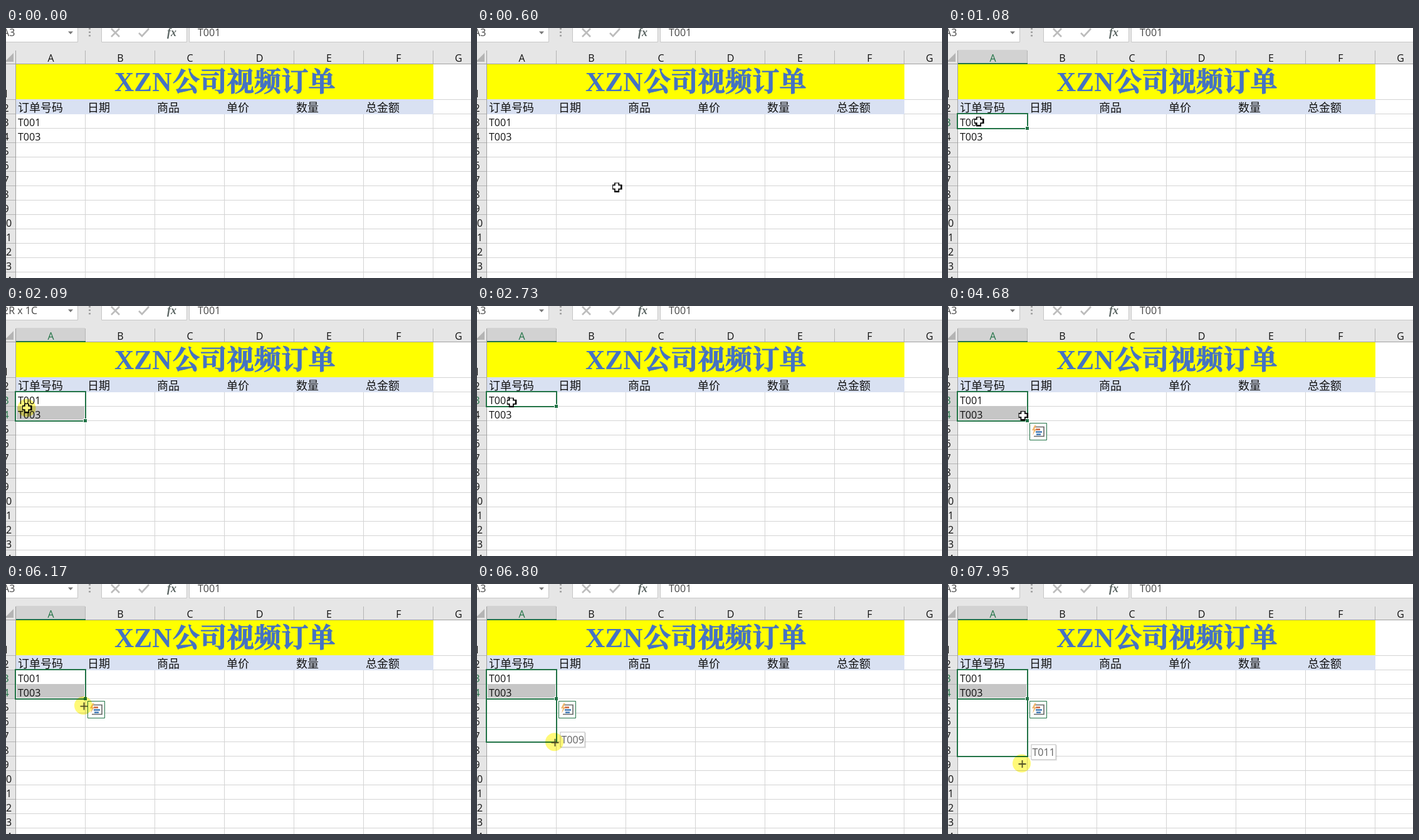
These frames come from a looping animation (742x400 px, 8000 ms). An HTML page:

```html
<!DOCTYPE html>
<html lang="zh">
<head>
<meta charset="utf-8">
<style>
html, body { margin: 0; width: 100%; height: 100%; overflow: hidden; background: #fff; }
svg { display: block; width: 742px; height: 400px; }
text { font: 16px "Open Sans", "Noto Sans CJK SC", "Noto Sans CJK", sans-serif; fill: #111; }
.cjk { font: 300 18px "Noto Sans CJK SC", "Noto Sans CJK", sans-serif; }
.title { font: bold 43.3px "Liberation Serif", "Noto Serif CJK SC", "Noto Sans CJK SC", "Noto Sans CJK", serif; fill: #4472c4; }
.heavy { stroke: #4472c4; stroke-width: .9; }
.fx { font: italic bold 18px "Liberation Serif", serif; fill: #5c6664; }
.mid { text-anchor: middle; }
.bar { fill: #444; }
.edge { fill: none; stroke: #217346; stroke-width: 2; }
</style>
</head>
<body>
<svg id="stage" viewBox="0 0 742 400" xmlns="http://www.w3.org/2000/svg">
  <g id="sheet"></g>
  <g id="head"></g>
  <g id="bars">
    <rect width="742" height="35" fill="#e6e6e6"/>
    <path d="M-5.5 22.5h120v-30M152.5-5v27.5h136V-5M292.5-5v27.5h460V-5" fill="#fff" stroke="#c6c6c6"/>
    <path d="M-5-5H114V22H-5z" fill="#fff"/>
    <path d="M99 5.5h8l-4 4.5z" fill="#777"/>
    <path d="M133.5 0V14" stroke="#a0a0a0" stroke-width="3" stroke-dasharray="2.5 3"/>
    <path d="M168 1l13 13M181 1l-13 13M212 8l5 5 11-12" fill="none" stroke="#bcbcbc" stroke-width="2.6"/>
    <text x="257" y="13" class="fx">fx</text>
    <text x="306" y="13" class="bar">T001</text>
    <text id="name" x="-5" y="13" class="bar">A3</text>
  </g>
  <g id="sel">
    <rect id="box" x="15" y="137" width="112" class="edge"/>
    <rect id="grip" x="123.5" width="6" height="6" fill="#217346" stroke="#fff"/>
  </g>
  <rect id="fill" x="15" y="137" width="112" class="edge"/>
  <g id="quick" transform="translate(130 187)">
    <path d="M.5.5h27v27H.5z" fill="#fff" stroke="#217346"/>
    <path d="M9 6.5h14v15H7" fill="none" stroke="#666" stroke-width="1.6"/>
    <path d="M10 10.5h7" stroke="#c9603c" stroke-width="2.5"/>
    <path d="M10 14.5h10M11 18.5h7" stroke="#3f78b4" stroke-width="2.5"/>
    <path d="M8 4L4 12h3l-2 8 6-10H8l3-6z" fill="#f0b870"/>
  </g>
  <g id="tip">
    <rect x="1.5" y="1.5" width="40" height="24.5" fill="#000" opacity=".1"/>
    <rect x=".5" y=".5" width="39" height="24" fill="#fff" stroke="#bebebe"/>
    <text id="tipText" x="2" y="18.5" style="fill:#606060">T009</text>
  </g>
  <g id="cursor">
    <g id="cross">
      <path d="M-7 0H8.5M0-7V8.5" stroke="#000" stroke-width="8"/>
      <path d="M-6 0H6M0-6V6" stroke="#fff" stroke-width="4.6"/>
    </g>
    <g id="move">
      <path d="M-8 0H8M0-8V8" stroke="#000" stroke-width="1.5"/>
      <path d="M-10 0l4-4v8zM10 0l-4-4v8zM0-10l-4 4h8z"/>
      <path d="M0 0v15l3.5-3 2.5 6 3-1-2.5-6H11z" fill="#fff" stroke="#000"/>
    </g>
    <path id="plus" d="M-6 0H6M0-6V6" stroke="#505050" stroke-width="1.8"/>
  </g>
  <circle id="press" r="14.5" fill="#fff978" style="mix-blend-mode:multiply"/>
</svg>
<script>
const LOOP = 8000, ROW = 23, COL = 111, TOP = 137, STEP = 78;
const $ = id => document.getElementById(id);
const rect = (x, y, w, h, f, id = '') => `<rect id="${id}" x="${x}" y="${y}" width="${w}" height="${h}" fill="${f}"/>`;
const label = (x, y, s, cls = '', id = '') => `<text id="${id}" x="${x}" y="${y}" class="${cls}">${s}</text>`;
const show = (id, on) => $(id).setAttribute('display', on ? 'inline' : 'none');
const set = (id, k, v) => $(id).setAttribute(k, v);
const at = (id, x, y) => set(id, 'transform', `translate(${x} ${y})`);
const within = (t, a, b) => t >= a && t < b;

function buildSheet() {
  let s = '', h = '';
  for (let x = 126; x < 742; x += COL) s += rect(x, 57, 1, 343, '#d4d4d4');
  for (let y = TOP; y < 400; y += ROW) s += rect(16, y, 726, 1, '#d4d4d4');
  s += rect(682, 114, 60, 1, '#d4d4d4');
  s += rect(16, 58, 666, 56, '#ff0') + rect(16, 114, 666, 24, '#d9e1f2');
  s += label(173, 101, 'XZN', 'title') + label(266, 101, '公司视频订单', 'title heavy');
  ['订单号码', '日期', '商品', '单价', '数量', '总金额'].forEach((t, i) => {
    s += label(19 + COL * i, 134, t, 'cjk');
  });
  s += rect(17, 160, 108, 22, '#c6c6c6', 'shade');
  s += label(19, 157, 'T001') + label(19, 180, 'T003');

  h += rect(0, 35, 742, 22, '#e6e6e6') + rect(0, 57, 15, 343, '#e6e6e6');
  h += rect(16, 35, 110, 22, '#d2d2d2', 'hotA');
  h += rect(0, 57, 742, 1, '#9f9f9f') + rect(15, 36, 1, 364, '#9f9f9f');
  h += '<path d="M12 40v14H-2z" fill="#b4b4b4"/>';
  [...'ABCDEFG'].forEach((c, i) => {
    h += label(i < 6 ? 71.5 + COL * i : 722, 53.5, c, 'mid', 'col' + c);
    h += rect(126 + COL * i, 36, 1, 21, '#b4b4b4');
  });
  for (let r = 1; r < 15; r++) {
    const y = TOP + ROW * (r - 3);
    h += rect(0, y + 1, 15, 22, r == 3 || r == 4 ? '#d2d2d2' : 'none', 'hot' + r);
    if (r > 1) h += rect(0, y, 15, 1, '#b4b4b4');
    h += label(0, r == 1 ? 111 : y + 20, r, 'mid', 'row' + r);
  }
  h += rect(16, 56, 111, 2, '#217346', 'edgeA') + rect(14, TOP, 2, ROW, '#217346', 'edgeRow');
  $('sheet').innerHTML = s;
  $('head').innerHTML = h;
}

// Pointer key points: start, end, x, y; the pointer is sampled every STEP ms
const MOVES = [
  [140, 910, 49, 149], [1290, 1380, 30, 149], [1610, 2090, 33, 163],
  [2340, 2430, 39, 150], [2660, 2960, 118, 169], [3130, 3130, 122, 158],
  [3430, 3660, 92, 149], [3980, 4300, 118, 175], [4530, 4850, 122, 175],
  [5080, 5610, 124.5, 181], [6090, 6880, 124.5, 261], [6950, 7570, 118.5, 283],
  [7800, 7950, 118.5, 288]
];
const PRESSES = [[910, 1080], [1610, 2660], [3830, 4530], [5940, LOOP]];

function pointer(t) {
  let x = 432, y = 381;
  for (const [a, b, ex, ey] of MOVES) {
    if (t < a) break;
    const n = Math.round((b - a) / STEP) + 1;
    const k = t >= b ? n : 1 + Math.floor((t - a) / (b - a) * (n - 1));
    x += (ex - x) * k / n;
    y += (ey - y) * k / n;
  }
  return [x, y];
}

function draw(t) {
  const [x, y] = pointer(t);
  const pressed = PRESSES.some(([a, b]) => within(t, a, b));
  const dropped = t >= 4530, filling = t >= 6090;
  const two = dropped || pressed && within(y, 160.5, 184);
  const picked = t >= 1000;
  const height = (two ? 2 : 1) * ROW + 1;
  const thin = t >= 5240, moving = within(t, 5080, 5240);
  const green = on => on ? 'fill:#217346' : '';

  $('name').textContent = two && !dropped ? '2R x 1C' : 'A3';
  show('hotA', t >= 910);
  for (const id of ['edgeA', 'edgeRow', 'hot3', 'sel']) show(id, picked);
  for (const id of ['hot4', 'shade']) show(id, two);
  for (const id of ['colA', 'row3']) set(id, 'style', green(picked));
  set('row4', 'style', green(two));
  for (const id of ['edgeRow', 'box']) set(id, 'height', height);
  set('grip', 'y', TOP + height - 3.5);
  show('quick', dropped);

  const extra = filling ? Math.max(0, Math.round((y - 186) / ROW)) : 0;
  show('fill', filling);
  set('fill', 'height', (2 + extra) * ROW + 1);
  show('tip', extra > 0);
  at('tip', 132.5, 176.5 + 20 * extra);
  $('tipText').textContent = 'T' + String(3 + 2 * extra).padStart(3, '0');

  show('cursor', t >= 140);
  at('cursor', x, y);
  show('cross', !thin && !moving);
  show('move', moving);
  show('plus', thin);
  show('press', pressed);
  at('press', x - thin, y - thin);
}

buildSheet();
const begin = performance.now();
function tick() {
  draw((performance.now() - begin) % LOOP);
  requestAnimationFrame(tick);
}
tick();
</script>
</body>
</html>
```
